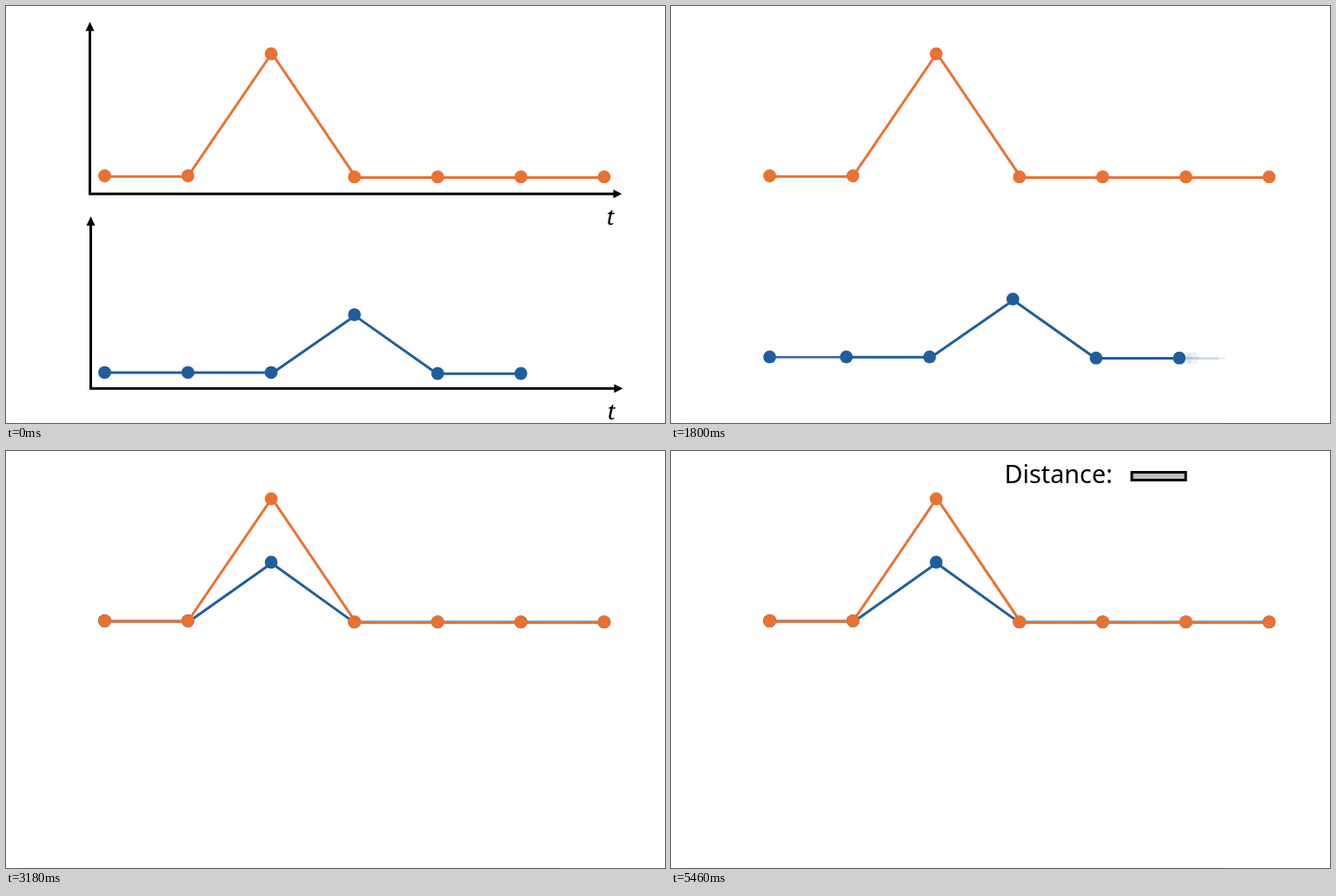
These frames come from a looping animation (758x480 px, 5.52 s). An HTML page:

```html
<!DOCTYPE html>
<html lang="en">
<head>
<meta charset="utf-8">
<title>Comparing two series</title>
<style>
  html, body { margin: 0; width: 100%; height: 100%; overflow: hidden; background: #fff; }
  svg { display: block; width: 758px; height: 480px; }
  .series { stroke-width: 3; }
  .series circle { stroke: none; }
  .orange { stroke: #e97132; fill: #e97132; }
  .blue { stroke: #1f5e9c; fill: #1f5e9c; }
  .axis { fill: none; stroke: #000; stroke-width: 3; }
  .t { font: italic 26px "Noto Serif", "Liberation Serif", serif; }
  .label { font: 28.8px "Noto Sans", "Open Sans", sans-serif; }
</style>
</head>
<body>
<svg viewBox="0 0 758 480">
  <defs>
    <g id="axes">
      <path class="axis" d="M0 -189V0H604"/>
      <path d="M-5 -187.5L0 -198L5 -187.5ZM602 -5L612 0L602 5Z"/>
      <text class="t" x="594" y="36">t</text>
    </g>
  </defs>
  <path d="M16 479.5H636" stroke="#f8f8f8"/>
  <g id="frame">
    <use href="#axes" x="96.5" y="216.3"/>
    <use href="#axes" x="97.5" y="440.3"/>
  </g>
  <g id="blue" class="series blue"></g>
  <g id="orange" class="series orange"></g>
  <g id="measure">
    <text class="label" x="383.5" y="37">Distance:</text>
    <rect id="bar" x="-31" y="-4.5" width="62" height="9" fill="#bfbfbf" stroke="#000" stroke-width="3"/>
  </g>
</svg>
<script>
const LOOP = 5520, STEP = 60;
const $ = id => document.getElementById(id);
const clamp = v => Math.min(1, Math.max(0, v));
const span = (t, from, to) => clamp((t - from) / (to - from));
const lerp = (a, b, p) => a + (b - a) * p;
const mix = (a, b, p) => ({ x: lerp(a.x, b.x, p), y: lerp(a.y, b.y, p) });
const sineEase = u => (1 - Math.cos(Math.PI * u)) / 2;
const quadEase = u => u < .5 ? 2 * u * u : 1 - 2 * (1 - u) ** 2;

function set(el, attrs) {
  for (const name in attrs) el.setAttribute(name, attrs[name]);
}
function add(parent, tag, count) {
  return Array.from({ length: count }, () =>
    parent.appendChild(document.createElementNS(parent.namespaceURI, tag)));
}

// A level series with one peak; the level drops slightly behind it
const DROP = 1.2;
const slotX = slot => 113.5 + 95.75 * slot;
const sample = (slot, { base, height, peak }) => ({
  x: slotX(slot),
  y: base + (slot > peak ? DROP : slot === peak ? -height : 0)
});

// Offsets of the lines from the dot centres, by direction
const ORANGE = { flat: [0, .8], rise: [0, .5], fall: [1.2, 0] };
const BLUE = { flat: [0, .3], rise: [0, 1.6], fall: [0, .8] };

function drawLink(line, a, b, offsets) {
  const climb = a.y - b.y;
  const [dx, dy] = climb > 9 ? offsets.rise : climb < -9 ? offsets.fall : offsets.flat;
  set(line, { x1: a.x + dx, y1: a.y + dy, x2: b.x + dx, y2: b.y + dy });
}
const drawDot = (dot, { x, y }) => set(dot, { cx: x, cy: y, r: 7.4 });

const SLOTS = 7, KEPT = 6, MOVING = 8;

function buildOrange() {
  const shape = { base: 195.5, height: 140.5, peak: 2 };
  const points = Array.from({ length: SLOTS }, (_, i) => sample(i, shape));
  add($('orange'), 'line', SLOTS - 1).forEach((line, i) =>
    drawLink(line, points[i], points[i + 1], ORANGE));
  add($('orange'), 'circle', SLOTS).forEach((dot, i) => drawDot(dot, points[i]));
}

// Blue shifts one slot left: the first two dots merge, two new ones fade in at the end
const before = { base: 421.8, height: 66.5, peak: 3 };
const after = { base: 195.6, height: 67.6, peak: 2 };
const links = add($('blue'), 'line', KEPT - 1);
const newLinks = add($('blue'), 'line', MOVING - KEPT);
const dots = add($('blue'), 'circle', MOVING);

function drawBlue(p) {
  const points = dots.map((_, i) =>
    mix(sample(Math.min(i, KEPT - 1), before), sample(Math.max(i - 1, 0), after), p));
  dots.forEach((dot, i) => {
    drawDot(dot, points[i]);
    set(dot, { opacity: i < KEPT ? 1 : clamp(Math.max(p, 2 * p - .5)) });
  });
  links.forEach((line, i) => drawLink(line, points[i], points[i + 1], BLUE));
  const thin = clamp(p * 2.5);
  set(links[0], { 'stroke-width': lerp(3, 1.5, thin), opacity: lerp(1, .6, thin) });

  const gap = slotX(1) - slotX(0), y = points[KEPT].y;
  newLinks.forEach((line, i) => {
    const x = lerp(537, slotX(4 + i), p);
    drawLink(line, { x, y }, { x: x + gap, y }, BLUE);
    set(line, { opacity: clamp(p * (i ? 1.1 : 1.6)) });
  });
}

// The bar travels right, then up, while it turns at a steady rate
function drawBar(t) {
  const across = 256.5, up = 64.5;
  const way = quadEase(span(t, 3400, 5180)) * (across + up);
  const x = 304.5 + Math.min(way, across), y = 93.5 - Math.max(0, way - across);
  const turn = -90 * (1 - span(t, 3230, 5390));
  set($('bar'), { transform: `translate(${x} ${y}) rotate(${turn})` });
}

function draw(now) {
  const t = Math.floor((now % LOOP) / STEP) * STEP;
  set($('frame'), { opacity: 1 - sineEase(span(t, 0, 1500)) });
  set($('measure'), { visibility: t >= 3240 ? 'visible' : 'hidden' });
  drawBlue(sineEase(span(t, 1530, 3020)));
  drawBar(t);
}

let start;
function tick(now) {
  start ??= now;
  draw(now - start);
  requestAnimationFrame(tick);
}
buildOrange();
draw(0);
requestAnimationFrame(tick);
</script>
</body>
</html>
```
